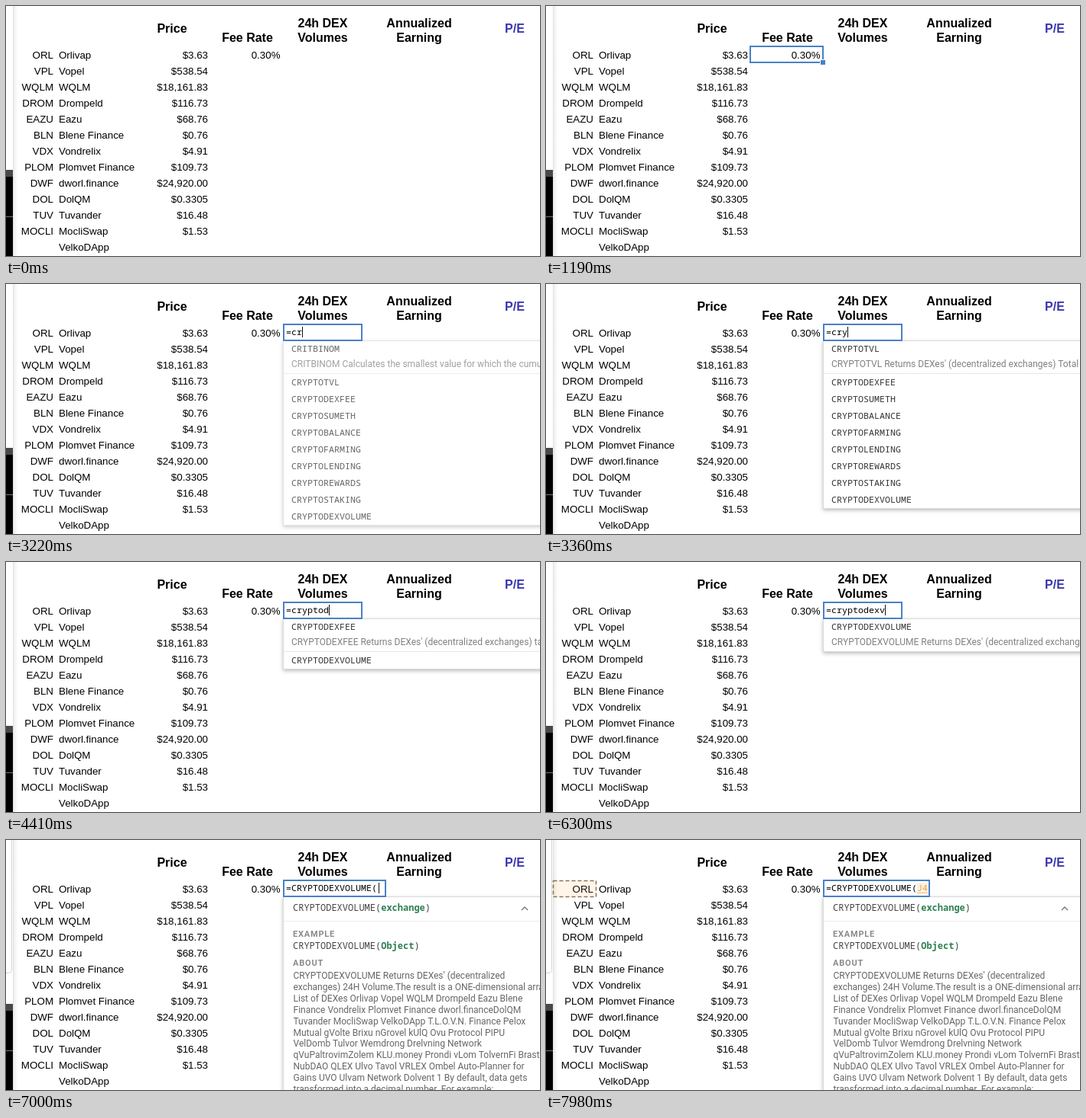
An HTML page with a canvas that plays this animation: 698x328 px, repeating every 8000 ms.

```html
<!DOCTYPE html>
<html lang="en">
<head>
<meta charset="utf-8">
<title>Spreadsheet formula</title>
<style>
html, body { margin: 0; width: 100%; height: 100%; overflow: hidden; background: #fff; }
canvas { display: block; width: 698px; height: 328px; }
</style>
</head>
<body>
<canvas id="stage"></canvas>
<script>
const W = 698, H = 328, LOOP = 8000, STEP = 70;
const canvas = document.getElementById('stage');
const ctx = canvas.getContext('2d');
const ratio = window.devicePixelRatio || 1;
canvas.width = W * ratio;
canvas.height = H * ratio;
ctx.scale(ratio, ratio);

const SHEET = '13.333px "Liberation Sans", Arial, sans-serif';
const HEAD = 'bold 16px "Liberation Sans", Arial, sans-serif';
const CODE = '11.667px "Noto Sans Mono", monospace';
const HELP_CODE = '12px "Noto Sans Mono", monospace';
const BODY = '12px Roboto, sans-serif';
const LABEL = 'bold 11px Roboto, sans-serif';
const BLUE = '#4a80c8', GREEN = '#2f8054', CHAR = 7;

const rows = [
  ['ORL', 'Orlivap', '$3.63'],
  ['VPL', 'Vopel', '$538.54'],
  ['WQLM', 'WQLM', '$18,161.83'],
  ['DROM', 'Drompeld', '$116.73'],
  ['EAZU', 'Eazu', '$68.76'],
  ['BLN', 'Blene Finance', '$0.76'],
  ['VDX', 'Vondrelix', '$4.91'],
  ['PLOM', 'Plomvet Finance', '$109.73'],
  ['DWF', 'dworl.finance', '$24,920.00'],
  ['DOL', 'DolQM', '$0.3305'],
  ['TUV', 'Tuvander', '$16.48'],
  ['MOCLI', 'MocliSwap', '$1.53'],
  ['', 'VelkoDApp', '']
];

const functions = ['TVL', 'DEXFEE', 'SUMETH', 'BALANCE', 'FARMING', 'LENDING',
  'REWARDS', 'STAKING', 'DEXVOLUME'].map(name => 'CRYPTO' + name);
const DEX = "Returns DEXes' (decentralized exchanges) ";
const descriptions = {
  CRITBINOM: 'Calculates the smallest value for which the cumulative binomial',
  CRYPTOTVL: DEX + 'Total Value Locked',
  CRYPTODEXFEE: DEX + 'taker fee',
  CRYPTODEXVOLUME: DEX + '24H Volume'
};

const about = [
  "CRYPTODEXVOLUME Returns DEXes' (decentralized",
  'exchanges) 24H Volume.The result is a ONE-dimensional array',
  'List of DEXes Orlivap Vopel WQLM Drompeld Eazu Blene',
  'Finance Vondrelix Plomvet Finance dworl.financeDolQM',
  'Tuvander MocliSwap VelkoDApp T.L.O.V.N. Finance Pelox',
  'Mutual gVolte Brixu nGrovel kUlQ Ovu Protocol PIPU',
  'VelDomb Tulvor Wemdrong Drelvning Network',
  'qVuPaltrovimZolem KLU.money Prondi vLom TolvernFi Brasto',
  'NubDAO QLEX Ulvo Tavol VRLEX Ombel Auto-Planner for',
  'Gains UVO Ulvam Network Dolvent 1 By default, data gets',
  'transformed into a decimal number. For example:'
];

const typing = [
  [2590, '='], [2730, '=c'], [3080, '=cr'], [3360, '=cry'], [3710, '=cryp'],
  [3990, '=crypt'], [4130, '=crypto'], [4410, '=cryptod'], [4480, '=cryptode'],
  [4900, '=cryptodex'], [5110, '=cryptodexv'], [6790, '=CRYPTODEXVOLUME('],
  [7910, '=CRYPTODEXVOLUME(J4']
];

function text(str, x, y, font, color = '#000', align = 'left') {
  ctx.font = font;
  ctx.fillStyle = color;
  ctx.textAlign = align;
  ctx.fillText(str, x, y);
}

function rect(x, y, w, h, color) {
  ctx.fillStyle = color;
  ctx.fillRect(x, y, w, h);
}

function outline(x, y, w, h, color, width) {
  ctx.strokeStyle = color;
  ctx.lineWidth = width;
  ctx.strokeRect(x, y, w, h);
}

function drawEdge() {
  rect(0, 215, 9, 113, '#000');
  rect(0, 215, 9, 9, '#48484a');
  rect(0, 276, 9, 1, '#777');
  const shade = ctx.createLinearGradient(9, 0, 16, 0);
  shade.addColorStop(0, '#dcdcdc');
  shade.addColorStop(0.25, '#f1f1f1');
  shade.addColorStop(1, '#fff');
  rect(9, 0, 7, H, shade);
}

// Corner of the window behind the sheet.
function drawBackCard() {
  ctx.strokeStyle = '#d4d4d4';
  ctx.lineWidth = 1;
  ctx.beginPath();
  ctx.moveTo(7.5, 0);
  ctx.arcTo(7.5, 174.5, 0, 174.5, 4);
  ctx.lineTo(0, 174.5);
  ctx.stroke();
}

function drawSheet() {
  rect(0, 0, W, H, '#fff');
  drawEdge();
  const head = (str, x, y, color = '#000') => text(str, x, y, HEAD, color, 'center');
  head('Price', 217, 35);
  head('Fee Rate', 315.5, 47);
  head('24h DEX', 414, 28);
  head('Volumes', 414, 47);
  head('Annualized', 540, 28);
  head('Earning', 540, 47);
  head('P/E', 665, 35, '#3a36b0');
  rows.forEach(([ticker, name, price], i) => {
    const y = 69 + 21 * i;
    text(ticker, 62, y, SHEET, '#000', 'right');
    text(name, 69, y, SHEET);
    text(price, 264, y, SHEET, '#000', 'right');
  });
  text('0.30%', 358.5, 69, SHEET, '#000', 'right');
}

function drawSelection(x, w) {
  outline(x, 53, w, 21, BLUE, 2);
  rect(x + w - 4, 70, 7, 7, '#fff');
  rect(x + w - 3, 71, 6, 6, BLUE);
}

function drawReference() {
  rect(9, 53, 57, 22, 'rgba(247,152,29,.1)');
  ctx.setLineDash([5, 3]);
  outline(9.5, 53.5, 56, 21, '#87745a', 1.5);
  ctx.setLineDash([]);
}

function drawEditor(str, caret) {
  const right = str.endsWith('J4') ? 502 : str.endsWith('(') ? 497 : 466;
  rect(362, 52, right - 362, 23, '#fff');
  outline(363, 53, right - 364, 21, BLUE, 2);
  const [formula, ref] = str.split('J');
  text(formula, 366, 67, CODE);
  const end = 366 + CHAR * str.length;
  if (ref) {
    rect(end - 2 * CHAR, 56, 2 * CHAR, 14, '#fbf1e0');
    text('J' + ref, end - 2 * CHAR, 67, CODE, '#e9a23b');
    rect(end - 2 * CHAR, 69, 2 * CHAR, 1, '#f0bd78');
  } else if (caret) {
    rect(end + (str.endsWith('(') ? 2 : 0), 56, 1, 14, '#111');
  }
}

// The sheet below is white, so only the shadow around the panel is painted.
function drawPanel(bottom) {
  ctx.save();
  ctx.beginPath();
  ctx.rect(0, 0, W, H);
  ctx.rect(362, 74, 350, bottom - 74);
  ctx.clip('evenodd');
  ctx.shadowColor = 'rgba(60,64,67,.35)';
  ctx.shadowBlur = 5;
  ctx.shadowOffsetY = 2;
  rect(362, 74, 350, bottom - 74, '#fff');
  ctx.restore();
  outline(362.5, 74.5, 350, bottom - 75, '#dadada', 1);
}

function drawSuggestions(names) {
  drawPanel(118 + (names.length - 1) * 22 + (names.length > 1 ? 1 : 0));
  names.forEach((name, i) =>
    text(name, 373, i ? 111 + 22 * i : 89, CODE, '#333'));
  text(names[0] + ' ' + descriptions[names[0]], 373, 109, BODY, '#808080');
  if (names.length > 1) rect(363, 117, 335, 1, '#e6e6e6');
}

function drawCall(argument, y, active) {
  const call = 'CRYPTODEXVOLUME(', gray = '#444';
  const x = 375 + call.length * 7.2;
  text(call, 375, y, HELP_CODE, gray);
  if (active) text(argument, x, y, 'bold ' + HELP_CODE, GREEN);
  else text(argument, x, y, HELP_CODE, gray);
  text(')', x + argument.length * 7.2, y, HELP_CODE, gray);
}

function drawLabel(str, y) {
  ctx.letterSpacing = '0.8px';
  text(str, 375, y, LABEL, '#8a8a8a');
  ctx.letterSpacing = '0px';
}

function drawHelp(active) {
  drawPanel(360);
  drawCall('exchange', 93, active);
  rect(363, 106, 335, 1, '#eee');
  ctx.strokeStyle = '#777';
  ctx.lineWidth = 1.4;
  ctx.beginPath();
  ctx.moveTo(674, 92);
  ctx.lineTo(678, 88);
  ctx.lineTo(682, 92);
  ctx.stroke();
  drawLabel('EXAMPLE', 127);
  drawCall('Object', 143, active);
  drawLabel('ABOUT', 165);
  about.forEach((line, i) => text(line, 375.5, 182 + 14.9 * i, BODY, '#666'));
}

function faded(alpha, draw) {
  ctx.save();
  ctx.globalAlpha = Math.max(0, Math.min(1, alpha));
  draw();
  ctx.restore();
}

function suggestionsFor(str) {
  const typed = str.slice(1).toUpperCase();
  return ['CRITBINOM', ...functions].filter(name => name.startsWith(typed));
}

function render(t) {
  drawSheet();
  if (t < 2590) {
    if (t >= 1190 && t < 1470) drawSelection(267, 95);
    else if (t >= 630) drawSelection(363, 102);
    return;
  }
  const [since, str] = typing.filter(([time]) => time <= t).pop();

  if (t >= 6790) {
    const shown = (t - 6720) / 280;
    if (shown < 1) faded(1 - shown, () => drawSuggestions(['CRYPTODEXVOLUME']));
    faded(shown, () => drawHelp(shown >= 1));
    if (shown >= 1) drawBackCard();
  } else if (t >= 3080) {
    faded((t - 3010) / 280, () => drawSuggestions(suggestionsFor(str)));
  }

  if (t >= 7910) drawReference();
  // The caret restarts its blink after each key.
  const blinkStart = str.endsWith('v') ? 5180 : since;
  drawEditor(str, Math.floor((t - blinkStart) / 560) % 2 === 0 || t < blinkStart);
}

function tick(now) {
  const t = now % LOOP;
  render(Math.floor(t / STEP) * STEP);
  requestAnimationFrame(tick);
}
render(0);
requestAnimationFrame(tick);
</script>
</body>
</html>
```
